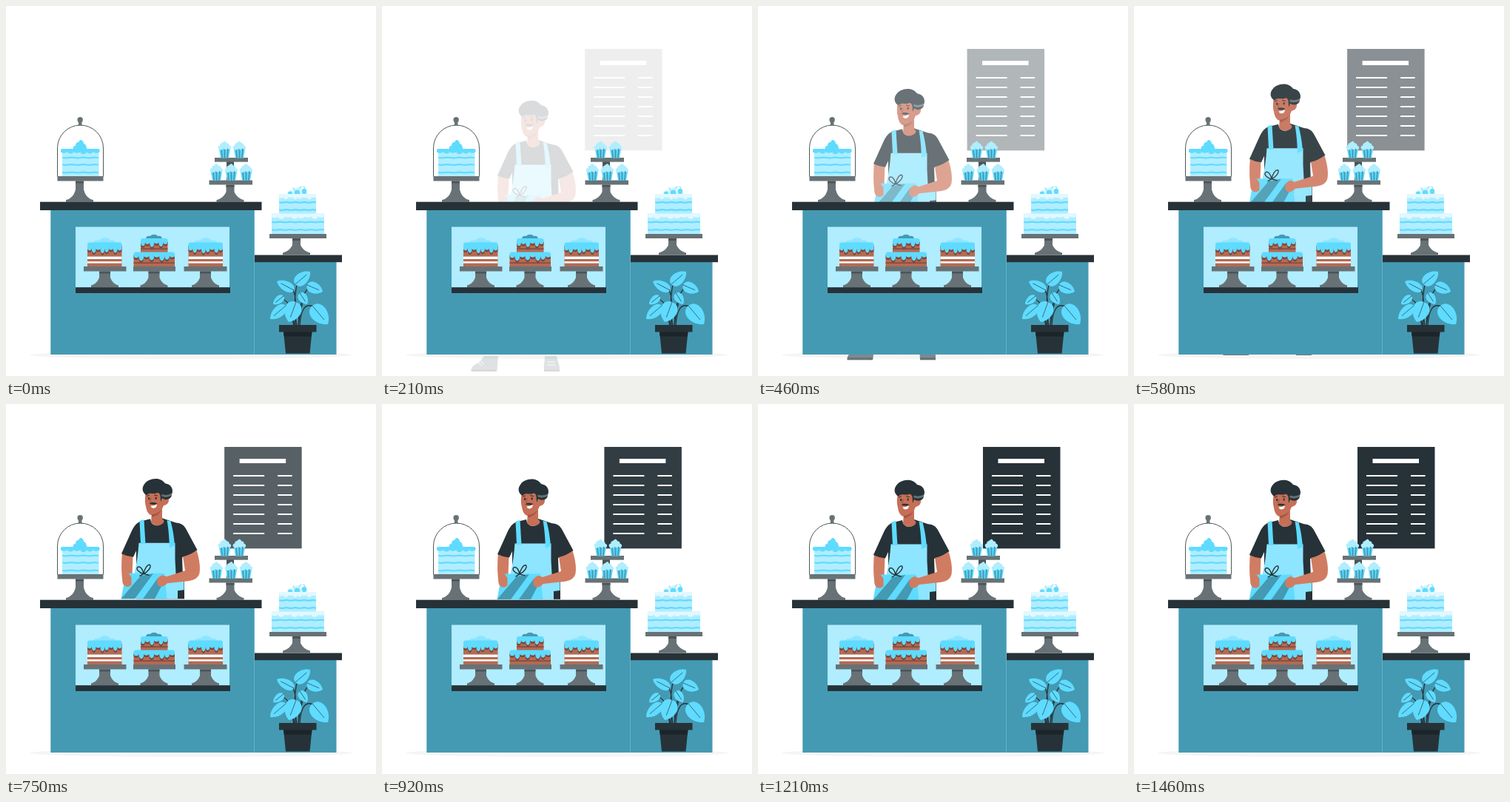
An HTML page that plays this animation: 500x500 px, repeating every 1.5 s.

```html
<!DOCTYPE html>
<html lang="en">
<head>
<meta charset="utf-8">
<title>Bakery counter</title>
<style>
  html, body { margin: 0; height: 100%; overflow: hidden; background: #fff; }
  svg { display: block; width: 100%; height: 100%; }
</style>
</head>
<body>
<svg id="stage" viewBox="0 0 500 500"></svg>
<script>
const BLUE = '#5fdbff', PALE = '#b0edff', SOFT = '#8de5ff', TEAL = '#449ab3', INK = '#263238',
      GREY = '#687276', BROWN = '#b26b55', COCOA = '#7d4338', SKIN = '#d07c62', FACE = '#c56f57';

const rect = (x, y, w, h, fill, r = 0) =>
  `<rect x="${x}" y="${y}" width="${w}" height="${h}" rx="${r}" fill="${fill}"/>`;
const path = (d, fill) => `<path d="${d}" fill="${fill}"/>`;
const line = (d, stroke, width = 1) =>
  `<path d="${d}" fill="none" stroke="${stroke}" stroke-width="${width}" stroke-linecap="round"/>`;
const dot = (x, y, rx, ry, fill) => `<ellipse cx="${x}" cy="${y}" rx="${rx}" ry="${ry}" fill="${fill}"/>`;
const at = (x, y, content) => `<g transform="translate(${x} ${y})">${content}</g>`;

// Icing: rounded top, one hanging lobe per entry in depths
function icing(x, y, w, h, depths, fill, r = 3) {
  const s = w / depths.length;
  const lobes = depths.map(d => `c0 ${d} ${-s} ${d} ${-s} 0`).join('');
  return path(`M${x} ${y + r}q0 ${-r} ${r} ${-r}h${w - 2 * r}q${r} 0 ${r} ${r}v${h - r}${lobes}z`, fill);
}

// Cake stand: plate at (x, y), flared foot resting on y = base
function stand(cx, base, x, y, w, h = 6.5, neck = 5.5) {
  const top = y + h - base, n = neck;
  return at(cx, base,
    path(`M${-n} ${top}H${n}V${top * .6}C${n + 2} -9 12 -4.5 18.5 -3V0H-18.5V-3C-12 -4.5 ${-n - 2} -9 ${-n} ${top * .6}z`, GREY) +
    rect(-n, top, 2 * n, 3, '#4b5458')) + rect(x, y, w, h, GREY);
}

function chocolateCake(x) {
  const drips = [4, 8, 3, 7, 9, 3, 8, 4];
  return rect(x, 324, 46.5, 28, BROWN) +
    rect(x, 338.6, 46.5, 3.4, '#fff') + rect(x, 345.2, 46.5, 2.4, '#fff') +
    icing(x, 322, 46.5, 8, drips, COCOA) +
    path(`M${x + 8} 321c0-4 4-5 8-4 3-5 13-5 15 0 5-1 8 1 8 4z`, SOFT) +
    icing(x, 319.5, 46.5, 8, drips, BLUE);
}

function tieredCake() {
  const tier = (x, y, w, h, drips) =>
    rect(x, y + 4, w, h - 4, BROWN) + rect(x, y + h - 5.5, w, 1.3, COCOA) +
    icing(x, y + 2.5, w, 5, drips, COCOA) + icing(x, y, w, 5, drips, BLUE);
  return path('M189 315c0-4 3-5 6-4 2-3 8-3 10 0 4-1 6 1 6 4z', TEAL) +
    tier(182, 314, 36.5, 19, [4, 8, 3, 9, 4, 7]) +
    tier(172.5, 332.5, 55.5, 19.5, [3, 7, 9, 3, 8, 3, 9, 4]);
}

function wave(x, y, w, n) {
  const s = w / n / 2;
  return line(`M${x} ${y}` + `q${s / 2} .8 ${s} 0t${s} 0`.repeat(n), BLUE, 2.2);
}

const domeCake = () =>
  rect(76, 195, 49.5, 35, PALE) +
  wave(77, 205, 47, 3) + wave(77, 214.5, 47, 3) + wave(77, 225, 47, 3) +
  path('M91 194c-1-4 1-5 3-5 0-4 2-5 4-5l2-3c3 0 5 2 5 5 3 1 4 3 3 4 2 1 1 3 1 4z', BLUE) +
  icing(74, 193, 52.5, 3.5, [3, 4, 5, 3, 4, 3], BLUE, 1.7) +
  line('M69.5 230V192a31 31 0 0 1 62 0v38', '#4f585c', 1) +
  path('M97.5 161.5l.7-3.5c-3-4-2-8 2-8s5 4 2 8l.7 3.5z', GREY);

const cupcake = (x, base) => at(x, base,
  path('M-8-15H8L5.5 0h-11z', BLUE) +
  path('M-5.6-14h2l1 14h-1.6zM-1-14h2V0h-2zM3.6-14h2L4.2 0H2.6z', TEAL) +
  path('M-8-12c-2-3 0-5 2-5-1-3 2-3 3-4l3-2c2 1 2 2 3 3 3 0 3 2 3 3 3 1 3 3 2 5-2 1-3 0-4-1-2 2-4 2-5 0-2 2-5 3-7 1z', PALE));

function weddingCake() {
  const tier = (x, y, w, h, n) =>
    rect(x, y, w, h, PALE) + wave(x + 1, y + h * .42, w - 2, n) + wave(x + 1, y + h * .8, w - 2, n) +
    icing(x - .5, y, w + 1, 3.5, [2, 5, 2, 4, 5, 2, 5, 3], '#e2f8ff', 1);
  return path('M380 255c0-6 5-7 8-6 2-5 9-5 11-1 5-1 9 2 8 7z', '#d9f6ff') +
    dot(393.5, 253, 3.8, 4.4, BLUE) + dot(403, 250.5, 3.2, 3.8, BLUE) + dot(384, 253, 3, 2.6, BLUE) +
    line('M390 249l-2-3m8 1l3-3m5 2l-2-2', SOFT, 1.5) +
    tier(369, 254, 50, 27, 4) + tier(359, 280.5, 71, 27.5, 5);
}

function leaf(x1, y1, x2, y2, w) {
  const len = Math.hypot(x2 - x1, y2 - y1), turn = Math.atan2(y2 - y1, x2 - x1) * 180 / Math.PI;
  return `<g transform="translate(${x1} ${y1}) rotate(${turn})">` +
    path(`M0 0C0 ${-w} ${len * .7} ${-w} ${len} 0C${len * .7} ${w} 0 ${w} 0 0z`, BLUE) +
    line(`M0 0H${len * .75}`, INK, .6) + '</g>';
}

const plant = () =>
  line('M393 432C389 410 390 388 394 373M391 432C390 405 394 390 386 382M395 432C396 405 402 385 411 379' +
    'M390 432C386 412 384 400 374 396M395 432C397 415 399 406 402 398M397 432C398 410 405 400 416 407' +
    'M389 432C386 418 385 408 376 405', INK, 1.3) +
  leaf(391, 376, 411, 359, 11) + leaf(389, 384, 366, 372, 9) + leaf(407, 377, 428, 386, 10) +
  leaf(375, 392, 361, 403, 7) + leaf(397, 388, 407, 403, 8) + leaf(378, 405, 357, 423, 10) +
  leaf(392, 400, 382, 427, 15) + leaf(414, 405, 435, 430, 15) +
  path('M375 440h38.5l-3 29.5h-32.5z', INK) + path('M375 440h38.5l-.7 6.5h-37.1z', '#1b2529') +
  rect(369, 431, 50.5, 9.5, INK);

function board() {
  let rows = '';
  for (let y = 97; y <= 175; y += 13) rows += `M314 ${y}h42M374 ${y}h19.5`;
  return rect(302, 58, 104.5, 137.3, INK) + rect(322.5, 74, 62.5, 6, '#fff') +
    `<path d="${rows}" stroke="#fff" stroke-width="1.8"/>`;
}

const head = () =>
  path('M197 146L211 138V157Q216 160 211 164Q203 169 196 162Z', FACE) +
  path('M190 116C188 124 187 133 189 140C190 148 194 152.5 198 152C205 151 210 147 213 139C220 138 222 131 218 126L213 116Z', FACE) +
  path('M197 151Q205 150 210 145Q206 153 197 154.5Z', '#a55644') +
  path('M190 125C184 122 183 115 187 110C192 102 208 99 215 109C223 110 227 117 224 124Q224 128 220 130' +
    'Q215 132 211 129L209 134L208.5 125C207 122 206 121 204 122C199 124 194 120 190 125Z', INK) +
  path('M210.5 123.5Q217 126 224 122.5V125.5Q217 129 210.5 126.5Z', '#667176') +
  dot(193.2, 129.5, 1.1, 1.8, INK) + dot(202.6, 129, 1.1, 1.8, INK) +
  line('M190.5 126l3-1M200.5 124.8l4 .8', INK, 1) + line('M196.3 129l-2 4.5 2 .6', '#96503f', .9) +
  path('M193.5 136.5C196 134 200 134.5 204.5 136C202 138.5 198 137.5 193.5 136.5Z', INK) +
  path('M195.5 139.5Q200 139.5 203.8 137.2Q204 142 199.5 142.6Q196.5 142.5 195.5 139.5Z', '#fff');

const gift = () =>
  path('M162 230.5H214L217.5 265H155.5Z', BLUE) +
  path('M182 234L199 231L174 265H155.5Z', TEAL) +
  path('M205 237L211 246L201 265H185Z', TEAL) +
  line('M186 231C180 230 175 225 178 222C182 220 185 226 186 231C187 225 191 218 194.5 219C197 222 191 229 186 231M186 231l-5 3m5-3l7 2', INK, 1.4);

const shoes = () =>
  path('M138 448H157L155.5 467.5H121C120 462 126 459 131 457Z', '#455a64') +
  path('M220 448H236L240 463V467.5H219C218 462 220 456 220 448Z', '#455a64') +
  rect(120.5, 466, 34.5, 3, INK) + rect(219, 466, 21, 3, INK) +
  line('M130 457l5 4m-2-6l5 4m86-3h9m-9 4h10', '#fff', .9);

const baker = () =>
  shoes() + rect(176, 240, 65, 25, INK) +
  path('M157 202L171.5 207L170 246C164 251 158 249 157.5 241C155.5 228 156 214 157 202Z', SKIN) +
  path('M195 157L183 160C177 162 174 165 170 173L156 204Q164 208 172 208.5L176 200V262H240L238 209' +
    'Q250 206 258.5 199L244 172C240 164 236 163 229 162L211 156Q211 166 203 166Q196 165 195 157Z', INK) +
  path('M181 189.5H228.5V212L230 240L240.5 239V253L232 254V265H174V228C177 216 178.5 203 179.5 189.5Z', SOFT) +
  path('M180.5 159.5L186.5 158L188.5 191H182Z', BLUE) +
  path('M217.5 159L222.5 160C225 169 227 180 228 193L221 196C220.5 182 219.5 169 217.5 159Z', BLUE) +
  head() + gift() +
  path('M157.5 233L165 229.5L169.5 236V246C164 251 158.5 248 157.5 242Z', SKIN) +
  path('M239 208Q249 206 257.5 199.5C261 210 263 222 261.5 230C260 237 254 240 246 241L218 244C212 250 206 250 204.5 244' +
    'C203 238 207 234 212 233L217 235L242 227Z', SKIN);

const stage = document.getElementById('stage');
stage.innerHTML =
  dot(250, 471.5, 218, 5.5, '#f5f5f5') +
  `<g id="board">${board()}</g><g id="baker">${baker()}</g>` +
  rect(60.3, 275, 275.5, 196, TEAL) + rect(335.5, 346, 111, 125, TEAL) +
  rect(335.2, 276, .7, 195, '#6db6ca') +
  rect(46, 264.7, 299.5, 11.3, INK) + rect(336, 336.5, 118, 9.7, INK) +
  rect(94, 298.5, 208, 82, PALE) +
  stand(133.5, 380.5, 105, 352, 57.5, 6.5, 7.5) + stand(200, 380.5, 172, 352, 57, 6.5, 7.5) +
  stand(269.5, 380.5, 240.5, 352, 58, 6.5, 7.5) +
  rect(94, 380.2, 209, 7.8, INK) +
  chocolateCake(110) + tieredCake() + chocolateCake(246.5) +
  stand(99.5, 265, 69.5, 230, 62) + domeCake() +
  rect(298, 210, 10, 28, '#4b5458') + stand(303, 265, 274.5, 235.5, 58.5, 6) + rect(282, 205, 45, 5.7, GREY) +
  cupcake(295.5, 205.5) + cupcake(315.5, 205.5) +
  cupcake(284.5, 236) + cupcake(304.5, 236) + cupcake(324.5, 236) +
  stand(392.5, 336.5, 356, 308, 77, 6) + weddingCake() + plant();

// cubic-bezier(.36, -.01, .5, 1.38): slow start, then a slight overshoot
function ease(x) {
  if (x <= 0) return 0;
  if (x >= 1) return 1;
  const curve = (a, b, u) => 3 * (1 - u) * (1 - u) * u * a + 3 * (1 - u) * u * u * b + u ** 3;
  let lo = 0, hi = 1;
  for (let i = 0; i < 30; i++) {
    const mid = (lo + hi) / 2;
    if (curve(.36, .5, mid) < x) lo = mid; else hi = mid;
  }
  return curve(-.01, 1.38, lo);
}

const LOOP = 1500, STEPS = 36, HOLD = 4;
const boardGroup = document.getElementById('board'), bakerGroup = document.getElementById('baker');

function place(group, p, dx, dy) {
  group.setAttribute('transform', `translate(${dx * (1 - p)} ${dy * (1 - p)})`);
  group.setAttribute('opacity', Math.max(0, Math.min(1, p)));
}

const start = performance.now();
function draw(now) {
  const t = Math.max(0, now - start) % LOOP;
  const step = Math.min(STEPS - 1, Math.floor((t + 5) / LOOP * STEPS));
  const clock = step < HOLD ? 0 : step / (STEPS - 1) * LOOP;
  place(boardGroup, ease(clock / 1500), -30, 0);
  place(bakerGroup, ease(clock / 1000), 0, 30);
  requestAnimationFrame(draw);
}
draw(start);
</script>
</body>
</html>
```
